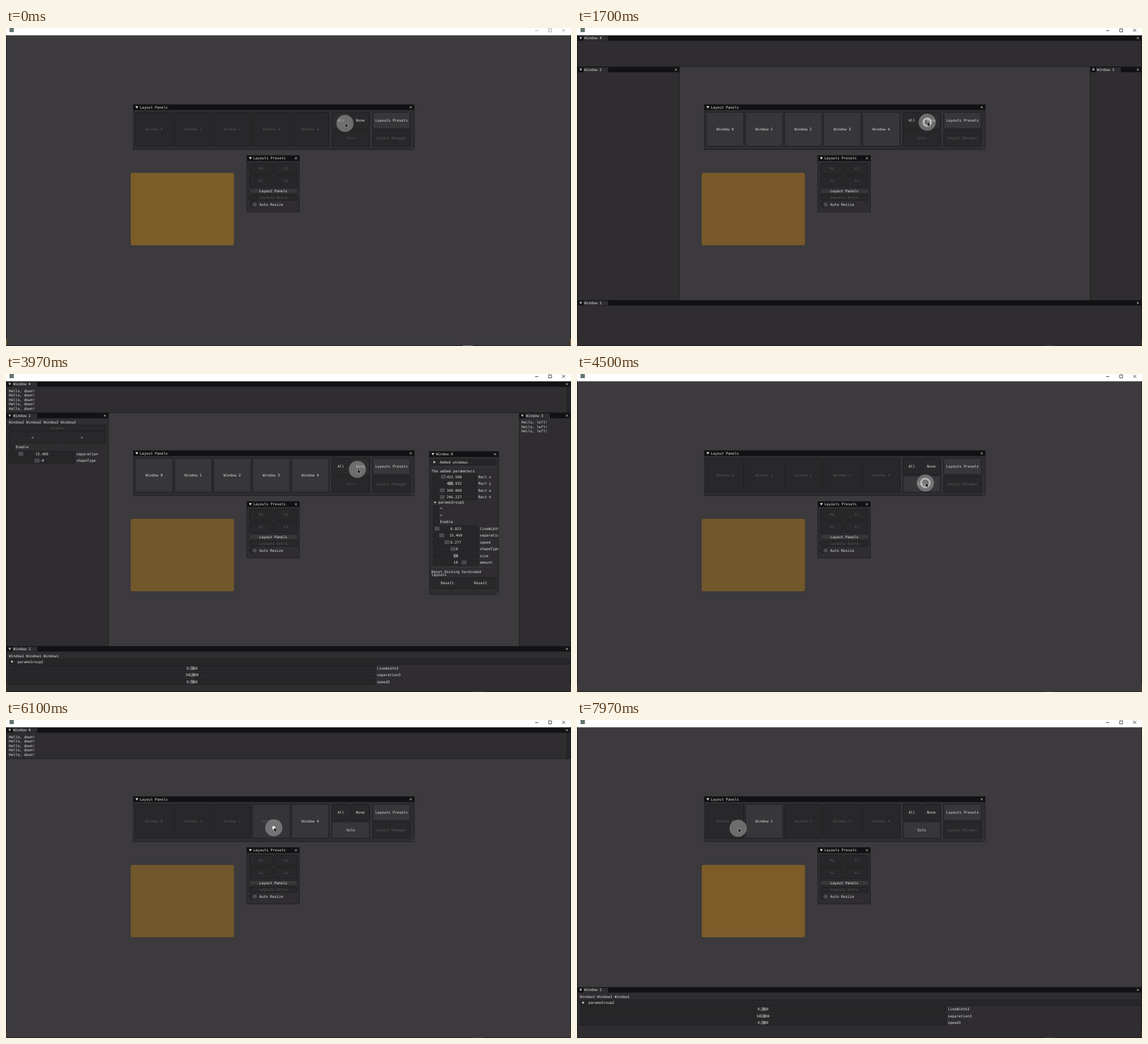
An HTML page that plays this animation: 960x540 px, repeating every 8 s.

```html
<!DOCTYPE html>
<html lang="en">
<head>
<meta charset="utf-8">
<title>Layout panels</title>
<style>
  html, body { margin: 0; width: 100%; height: 100%; overflow: hidden; background: #3c3a3d; }
  svg { display: block; width: 960px; height: 540px; }
  text { font: 6.1px "DejaVu Sans Mono", "Noto Sans Mono", monospace; fill: #e2e2e2; white-space: pre; text-rendering: geometricPrecision; }
  .mid { text-anchor: middle; }
  .body { fill: #2f2d30; stroke: #1a191b; stroke-width: .8; }
  .bar { fill: #121113; }
  .tab { fill: #2f2d30; }
  .icon { fill: #e2e2e2; }
  .cross { stroke: #e2e2e2; stroke-width: .8; }
  .field { fill: #272628; stroke: #1c1b1d; stroke-width: .7; }
  .grab { fill: #4a494c; }
  .line { stroke: #414043; stroke-width: .6; }
  .btn rect { fill: #282729; stroke: #1b1a1c; stroke-width: .8; }
  .btn text { fill: #59585a; }
  .btn.hot rect { fill: #353437; }
  .btn.on rect { fill: #373639; }
  .btn.plain rect { fill: #29282a; }
  .btn.plain.hot rect { fill: #2d2c2e; }
  .btn.on text, .btn.plain text { fill: #e2e2e2; }
  #controls { stroke: #111; stroke-width: .8; fill: none; }
  .idle #controls { stroke: #8c8c8c; }
  .edge { fill: #5d3b1e; }
  .idle .edge { fill: #a86c20; }
</style>
</head>
<body>
<svg id="stage" viewBox="0 0 960 540"></svg>
<script>
const LOOP = 8000;
const stage = document.getElementById('stage');
const $ = id => document.getElementById(id);

// Drawing helpers
const rect = (cls, x, y, w, h, r = 0) =>
  `<rect class="${cls}" x="${x}" y="${y}" width="${w}" height="${h}" rx="${r}"/>`;
const text = (s, x, cy, cls = '') =>
  `<text class="${cls}" x="${x}" y="${cy + 2.1}">${s.replace('<', '&lt;').replace('>', '&gt;')}</text>`;
const cross = (x, y) =>
  `<path class="cross" d="M${x - 1.7} ${y - 1.7}l3.4 3.4m0 -3.4l-3.4 3.4"/>`;
const down = (x, y, r = 2.4) =>
  `<path class="icon" d="M${x - r} ${y - r * .8}h${2 * r}l${-r} ${r * 1.7}z"/>`;
const right = (x, y) => `<path class="icon" d="M${x - 1.5} ${y - 2.1}v4.2l3.6 -2.1z"/>`;
const line = (x1, y1, x2, y2) => `<path class="line" d="M${x1} ${y1}L${x2} ${y2}"/>`;
const button = (label, x, y, w, h, cls = '', id = '') =>
  `<g class="btn ${cls}" id="${id}">${rect('', x, y, w, h, 1.5)}${text(label, x + w / 2, y + h / 2, 'mid')}</g>`;
const check = (label, x, cy) =>
  rect('field', x, cy - 4.5, 9, 9, 1) + text(label, x + 11.5, cy);
const slider = (label, value, x, w, cy, grab) =>
  rect('field', x, cy - 4.5, w, 9, 1) + rect('grab', grab, cy - 3.6, 8.5, 7.2, .8) +
  text(value, x + w / 2, cy, 'mid') + text(label, x + w + 2.5, cy);
const header = (label, x, w, cy, tx) =>
  rect('field', x, cy - 4.6, w, 9.2, 1) + right(x + 5.5, cy) + text(label, tx, cy);

const floating = (title, x, y, w, h, content) =>
  rect('body', x, y, w, h) + rect('bar', x, y, w, 9.2) + down(x + 6, y + 4.6) +
  text(title, x + 11, y + 4.5) + cross(x + w - 6, y + 4.6) + content;

const docked = (n, x, y, w, h, content) =>
  `<g id="win${n}">` + rect('body', x, y, w, h) + rect('bar', x, y, w, 8.8) +
  rect('tab', x + 10, y + .8, 42, 8) +
  `<path class="icon" d="M${x + 3.4} ${y + 2.2}h4v.8h-4zm0 1.6h4l-2 2.4z"/>` +
  text('Window ' + n, x + 11.6, y + 4.2) + cross(x + w - 6, y + 4.4) +
  `<g class="content">${content}</g></g>`;

const repeat = (s, n, x, cy) =>
  Array.from({ length: n }, (_, i) => text(s, x, cy + 7.5 * i)).join('');

const win4 = docked(4, 1, 12.8, 958, 53,
  repeat('Hello, down!', 5, 5, 28.5) + rect('field', 952.5, 22, 4.5, 43));

const win2 = docked(2, 1, 66.3, 173, 530,
  text('Window2 Window2 Window2 Window2', 5, 82) +
  button('Enable', 5, 87, 164, 9.3) +
  button('<', 5, 98.2, 80.3, 18.8, 'plain') + button('>', 88.5, 98.2, 80.5, 18.8, 'plain') +
  check('Enable', 5, 124) +
  slider('separation', '15.469', 5, 112, 135.5, 21) +
  slider('shapeType', '-0', 5, 112, 147, 48.5));

const win3 = docked(3, 872, 66.3, 87, 530, repeat('Hello, left!', 3, 876, 82));

const win1 = docked(1, 1, 462.5, 958, 90,
  text('Window1 Window1 Window1', 5, 478.5) +
  header('paramsGroup2', 5, 952, 488.4, 19.5) +
  [['lineWidth3', '0.500'], ['separation3', '50.000'], ['speed3', '0.500']]
    .map(([l, v], i) => slider(l, v, 5, 622.5, 499.5 + 11.5 * i, 312)).join(''));

const rects = [['x', '422.598', 739], ['y', '488.932', 751], ['w', '349.909', 737], ['h', '246.227', 737]];
const params = [['lineWidth', '0.023', 728], ['separation', '15.469', 736], ['speed', '0.277', 745],
  ['shapeType', '-0', 755], ['size', '54', 760], ['amount', '18', 774]];
const win0 = '<g id="win0">' + floating('Window 0', 719.4, 131.6, 117.6, 243,
  '<g clip-path="url(#clip0)">' +
  header('Added windows', 722.5, 110, 149.7, 737) +
  line(723, 158.5, 833, 158.5) + text('The added parameters', 723, 165) +
  rects.map(([l, v, g], i) => slider('Rect ' + l, v, 723, 77, 174.5 + 11.5 * i, g)).join('') +
  down(729, 218.5, 1.8) + text('paramsGroup1', 734.5, 218.3) +
  ['<', '>', 'Enable'].map((l, i) => check(l, 726, 228 + 11.5 * i)).join('') +
  params.map(([l, v, g], i) => slider(l, v, 726, 76.5, 262.5 + 11.5 * i, g)).join('') +
  line(723, 328.5, 833, 328.5) +
  text('Reset Docking hardcoded', 723, 335.5) + text('layouts', 723, 341.2) +
  button('Reset1', 723, 346, 53.5, 18.3, 'plain') + button('Reset2', 779.5, 346, 53.5, 18.3, 'plain') +
  '</g><path class="grab" d="M836 370.5v3.5h-3.5z"/>') + '</g>';

const winX = i => 220 + 66.3 * i;
const panels = floating('Layout Panels', 216.3, 130, 477.4, 76.6,
  [0, 1, 2, 3, 4].map(i => button('Window ' + i, winX(i), 143.2, 63.4, 57.4, '', 'btn' + i)).join('') +
  line(551.5, 143, 551.5, 201) + line(620.5, 143, 620.5, 201) +
  button('All', 554, 143.2, 29.8, 27.6, 'plain', 'all') +
  button('None', 587, 143.2, 30.4, 27.6, 'plain', 'none') +
  button('Solo', 554, 173, 63.4, 27.6, '', 'solo') +
  button('Layouts Presets', 623.4, 143.2, 63.4, 27.6, 'on') +
  button('Layout Manager', 623.4, 173, 63.4, 27.6) +
  '<path class="grab" d="M693 202.5v3.5h-3.5z"/>');

const presets = floating('Layouts Presets', 409.2, 216.6, 89.4, 95.6,
  [0, 1, 2, 3].map(i => button('P' + i, 413.4 + 42.4 * (i % 2), 229.8 + 21 * (i >> 1), 39.2, 18.6)).join('') +
  button('Layout Panels', 413.4, 272.4, 81.6, 8.6, 'on') +
  button('Layouts Extra', 413.4, 283.8, 81.6, 8.8) +
  rect('field', 413.6, 295.2, 13.6, 9, 4.5) + '<circle class="grab" cx="422.6" cy="299.7" r="3.8"/>' +
  text('Auto Resize', 430.5, 299.6));

stage.innerHTML =
  '<clipPath id="clip0"><rect x="720" y="141" width="116.2" height="233"/></clipPath>' +
  '<rect width="960" height="540" fill="#3c3a3d"/>' +
  '<rect id="box" x="212" y="246" width="175.3" height="123" rx="3"/>' +
  win4 + win2 + win3 + win1 + win0 + panels + presets +
  '<rect width="960" height="12.4" fill="#fff"/><rect x="6" y="0" width="7.4" height="7" fill="#66756e"/>' +
  '<path id="controls" d="M899 4.5h5.4M922 1.6h5v5h-5zM945 1.5l5 5m0 -5l-5 5"/>' +
  '<path d="M.5 12V540M959.5 12V540M0 539.5H960" stroke="#1d1c1e" fill="none"/>' +
  rect('edge', 0, 528, 1, 11) + rect('edge', 959, 528, 1, 11) +
  '<rect id="mark" y="539" height="1" width="17" fill="#77767a"/>' +
  '<g id="pointer"><circle r="14.6" fill="#a0a0a0" opacity=".58"/>' +
  '<circle id="ripple" fill="none" stroke="#fff" stroke-width="3"/>' +
  '<path d="M.6 -.4v7.4l1.7 -1.5 1.2 2.6 1.3 -.6 -1.2 -2.5h2.3z" fill="#080808" stroke="#ddd" stroke-width=".45"/></g>';

// Timeline
const path = [[0, 576, 162], [400, 576, 162], [770, 595, 160], [1740, 595, 160], [2000, 601, 160],
  [2330, 601, 160], [2700, 586, 177], [2870, 586, 177], [3030, 582, 182], [3150, 573, 162],
  [3340, 573, 162], [3600, 597, 162], [4170, 597, 162], [4300, 592, 185], [4700, 592, 185],
  [5330, 513, 184], [5870, 513, 184], [6070, 455, 183], [6270, 455, 183], [6600, 393, 182],
  [6880, 393, 182], [7300, 322, 183], [7700, 322, 183], [8040, 268, 184]];
const presses = [170, 1530, 3170, 4000, 4300, 5370, 6080, 6700, 7470];
const shown = [[0, ''], [333, '01234'], [1733, ''], [3333, '01234'], [4167, ''],
  [5530, '4'], [6233, '3'], [6850, '2'], [7630, '1']];
const closing = [[1700, 1733], [4133, 4167]];
const soloAt = 4467;
const tones = [[0, 123, 93, 41], [770, 121, 89, 42], [1700, 121, 89, 42], [2330, 123, 91, 41], [3030, 126, 94, 39],
  [3970, 114, 87, 43], [6770, 113, 87, 43], [7970, 124, 92, 41], [8000, 124, 92, 41]];
const soloShift = { 1: -8.5, 2: -53.5, 3: -53.5, 4: 0 };

function sample(keys, t, ease = u => u) {
  const i = Math.max(1, keys.findIndex(k => k[0] > t));
  const a = keys[i - 1], b = keys[i];
  const u = ease(Math.max(0, (t - a[0]) / (b[0] - a[0])));
  return a.slice(1).map((v, j) => v + (b[j + 1] - v) * u);
}
const smooth = u => u * u * (3 - 2 * u);

const targets = ['btn0', 'btn1', 'btn2', 'btn3', 'btn4', 'all', 'none', 'solo'].map($).map(el => {
  const r = el.firstChild, n = k => +r.getAttribute(k);
  return { el, x: n('x'), y: n('y'), w: n('width'), h: n('height') };
});

function draw(t) {
  const open = shown.filter(s => s[0] <= t).pop()[1];
  const ghost = closing.some(([a, b]) => t >= a && t < b);
  for (let n = 0; n < 5; n++) {
    const on = open.includes(n), win = $('win' + n);
    $('btn' + n).classList.toggle('on', on);
    win.style.display = on && !(ghost && n === 0) ? '' : 'none';
    if (n === 0) continue;
    win.setAttribute('transform', `translate(0 ${open.length === 1 ? soloShift[n] : 0})`);
    win.querySelector('.content').style.display = ghost ? 'none' : '';
  }
  $('solo').classList.toggle('on', t >= soloAt);

  const [hx, hy] = sample(path, Math.max(0, t - 60), smooth);
  for (const b of targets)
    b.el.classList.toggle('hot', hx >= b.x && hx <= b.x + b.w && hy >= b.y && hy <= b.y + b.h);

  const [x, y] = sample(path, t, smooth);
  $('pointer').setAttribute('transform', `translate(${x} ${y})`);
  const age = t - (presses.filter(p => p <= t).pop() ?? -LOOP);
  $('ripple').setAttribute('r', Math.min(14, .5 + .034 * age));
  $('ripple').setAttribute('opacity', Math.max(0, 1 - age / 400));

  $('box').setAttribute('fill', `rgb(${sample(tones, t).map(Math.round)})`);
  const idle = t < 170;
  stage.classList.toggle('idle', idle);
  $('mark').setAttribute('x', idle ? 776 : 794);
  $('mark').setAttribute('opacity', idle ? 1 : .35);
}

const start = performance.now();
function tick() {
  draw((performance.now() - start) % LOOP);
  requestAnimationFrame(tick);
}
tick();
</script>
</body>
</html>
```
